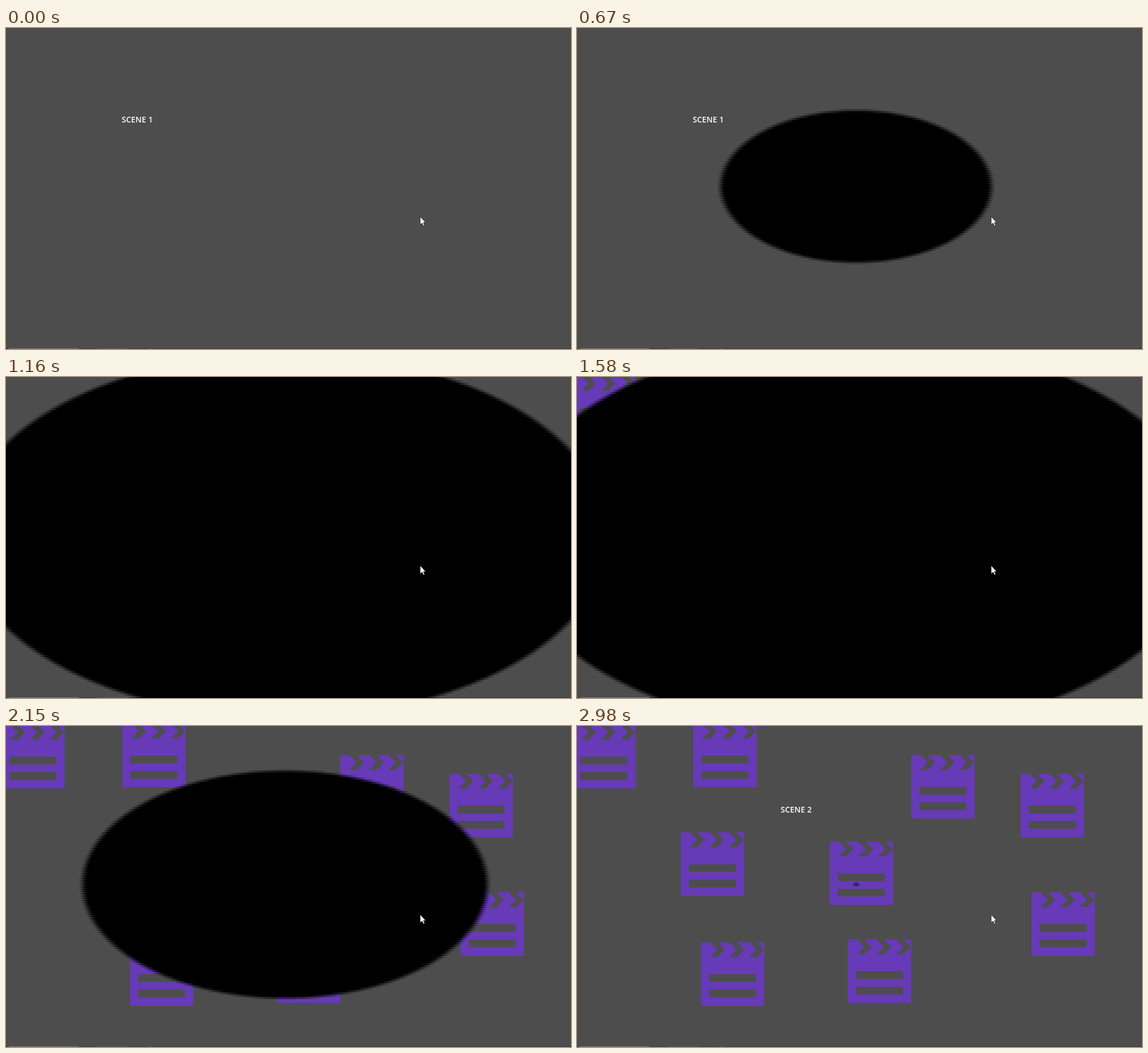
An HTML page with a canvas for the animation above (3380 ms loop, 994x564 px).

```html
<!DOCTYPE html>
<html lang="en">
<head>
<meta charset="utf-8">
<title>Scene transition</title>
<style>
  html, body { margin: 0; width: 100%; height: 100%; overflow: hidden; background: #4d4d4d; }
  svg, canvas { position: absolute; left: 0; top: 0; width: 994px; height: 564px; display: block; }
  text { font: 600 13.95px "Open Sans", "Noto Sans", sans-serif; fill: #fff; }
  [hidden] { display: none; }
</style>
</head>
<body>
<svg viewBox="0 0 994 564">
  <defs>
    <path id="clap" fill="#673ab7" fill-rule="evenodd" d="M0 0H111.5V111.5H0Z
      M16 0h13l13 13l-13 13h-13l13 -13z
      M50.5 0h13l13 13l-13 13h-13l13 -13z
      M85 0h13l13 13l-13 13h-13l13 -13z
      M14.5 56H97V69.5H14.5Z M14.5 83H97V96.5H14.5Z"/>
  </defs>
  <rect width="994" height="564" fill="#4d4d4d"/>
  <g id="first"><text x="203.6" y="165.6">SCENE 1</text></g>
  <g id="second" hidden>
    <use href="#clap" x="-8.5" y="-2"/>
    <use href="#clap" x="204.5" y="-4"/>
    <use href="#clap" x="588" y="51"/>
    <use href="#clap" x="780.3" y="84"/>
    <use href="#clap" x="182.5" y="187"/>
    <use href="#clap" x="444.5" y="203"/>
    <use href="#clap" x="799.5" y="292"/>
    <use href="#clap" x="218" y="380"/>
    <use href="#clap" x="476.5" y="375"/>
    <text x="358.3" y="151.8">SCENE 2</text>
  </g>
  <path d="M0 563H994V564H0Z" fill="#3b3137"/>
  <path d="M5 563H128V564H5Z" fill="#8a7d84"/>
  <path d="M160 563H214V564H160ZM250 563H258V564H250Z" fill="#67595f"/>
</svg>
<canvas id="iris" width="994" height="564"></canvas>
<svg viewBox="0 0 994 564">
  <path d="M728.7 331.3V345.7L732 342.8L734.3 347.7L736.6 346.7L734.4 341.9H738.4Z"
        fill="#fff" stroke="#111" stroke-width=".8"/>
</svg>
<script>
const LOOP = 3380, STEP = 70, OPEN = 390, SWAP = 1440, END = 2980;
const CX = 491, CY = 278.5, RATIO = 0.5613, SOFT = 12;
// time in ms, horizontal radius
const grow = [[390, 53], [670, 244], [950, 433.5], [1370, 716], [1440, 770]];
const shrink = [[1510, 659], [1580, 624], [2010, 428.5], [2150, 362], [2430, 236], [2570, 174], [2980, 8]];

const first = document.getElementById('first');
const second = document.getElementById('second');
const ctx = document.getElementById('iris').getContext('2d');
const start = performance.now();
let drawn = -1;

function lerpKeys(keys, t) {
  let i = 1;
  while (i < keys.length - 1 && t > keys[i][0]) i++;
  const [t0, r0] = keys[i - 1], [t1, r1] = keys[i];
  return r0 + (r1 - r0) * (t - t0) / (t1 - t0);
}

// the picture advances in even steps
function snap(t) {
  if (t < OPEN) return 0;
  if (t >= END) return END;
  const base = t < 2010 ? OPEN : 2010;
  return base + Math.floor((t - base) / STEP) * STEP;
}

function softDisc(r) {
  const g = ctx.createRadialGradient(0, 0, Math.max(0, r - SOFT), 0, 0, r);
  g.addColorStop(0, `rgba(0,0,0,${Math.min(1, r / SOFT)})`);
  g.addColorStop(1, 'rgba(0,0,0,0)');
  return g;
}

function drawIris(r) {
  ctx.setTransform(1, 0, 0, 1, 0, 0);
  ctx.clearRect(0, 0, 994, 564);
  if (r <= 0) return;
  // alternating bands give the edge its fine teeth
  const jag = r > 20 ? 1.5 : 0;
  for (const side of [0, 1]) {
    ctx.setTransform(1, 0, 0, 1, 0, 0);
    ctx.beginPath();
    for (let y = side * 2; y < 564; y += 4) ctx.rect(0, y, 994, 2);
    ctx.setTransform(1, 0, 0, RATIO, CX, CY);
    ctx.fillStyle = softDisc(r + (side ? jag : -jag));
    ctx.fill();
  }
}

function frame() {
  const t = snap((performance.now() - start) % LOOP);
  if (t !== drawn) {
    drawn = t;
    first.toggleAttribute('hidden', t >= SWAP);
    second.toggleAttribute('hidden', t < SWAP);
    drawIris(t < OPEN ? 0 : lerpKeys(t <= SWAP ? grow : shrink, t));
  }
  requestAnimationFrame(frame);
}
frame();
</script>
</body>
</html>
```
